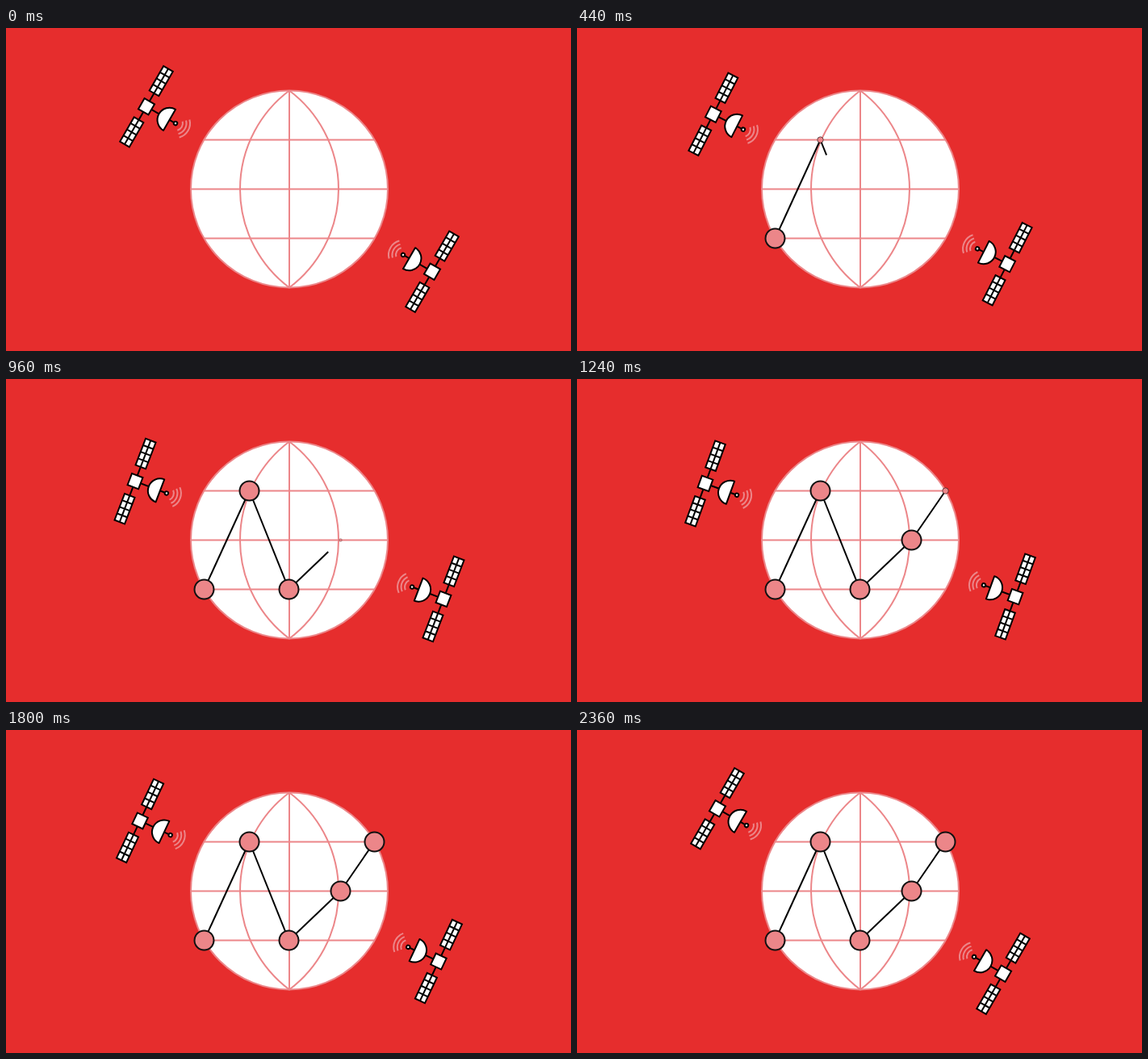
An HTML page for the animation above (2400 ms loop, 700 by 400 pixels).

```html
<!DOCTYPE html>
<html lang="en">
<head>
<meta charset="utf-8">
<title>Satellites</title>
<style>
  html, body { margin: 0; width: 100%; height: 100%; overflow: hidden; background: #e62d2d; }
  svg { display: block; width: 700px; height: 400px; }
  .pink { stroke: #ec8689; stroke-width: 2; fill: none; }
  .ink { stroke: #000; stroke-width: 2; fill: #fff; }
  #route { fill: none; stroke: #000; stroke-width: 2; stroke-linejoin: round; }
  #dots circle { fill: #ec8689; stroke: #111; stroke-width: 2; }
</style>
</head>
<body>
<svg viewBox="0 0 700 400">
  <defs>
    <g id="panel">
      <rect x="-6.7" y="-54" width="13.4" height="35"/>
      <path d="M0 -54V-19M-6.7 -45.25H6.7M-6.7 -36.5H6.7M-6.7 -27.75H6.7"/>
    </g>
    <g id="sat" transform="translate(-204.4 0)">
      <g class="ink">
        <path d="M0 -19V19M0 0H41"/>
        <use href="#panel"/>
        <use href="#panel" transform="rotate(180)"/>
        <rect x="-7.2" y="-7.6" width="14.4" height="15.2"/>
        <path d="M33 -15A15 15 0 0 0 33 15Z" stroke-linejoin="round"/>
        <circle cx="41.6" r="2.2"/>
      </g>
      <g id="waves" class="pink" transform="translate(41.6 0)"></g>
    </g>
  </defs>

  <g transform="translate(351 199.5)">
    <g class="pink">
      <circle r="122" style="fill:#fff"/>
      <path d="M0 -122V122M-122 0H122M-105.6 -61H105.6M-105.6 61H105.6"/>
      <path d="M0 -122A152.5 152.5 0 0 0 0 122A152.5 152.5 0 0 0 0 -122"/>
    </g>
    <g id="orbit">
      <use href="#sat"/>
      <use href="#sat" transform="rotate(180)"/>
    </g>
  </g>

  <polyline id="route" pathLength="1"/>
  <g id="dots"></g>
</svg>
<script>
  const LOOP = 2400, SWING = 2380;
  const points = [[245.5, 260.5], [301.5, 138.5], [350.5, 260.5], [414.5, 199.5], [456.5, 138.5]];
  const get = id => document.getElementById(id);
  const add = (parent, tag, attrs) => {
    const el = document.createElementNS('http://www.w3.org/2000/svg', tag);
    for (const key in attrs) el.setAttribute(key, attrs[key]);
    return parent.appendChild(el);
  };
  const sine = p => (1 - Math.cos(Math.PI * p)) / 2;
  const clamp = p => Math.min(1, Math.max(0, p));

  for (const r of [9, 13.5, 18]) {
    const c = r * Math.SQRT1_2;
    add(get('waves'), 'path', { d: `M${c} ${-c}A${r} ${r} 0 0 1 ${c} ${c}`, 'stroke-width': 2 });
  }

  const orbit = get('orbit'), route = get('route');
  route.setAttribute('points', points.join(' '));
  const dots = points.map(() => add(get('dots'), 'circle', { r: 12 }));

  function draw(t) {
    orbit.setAttribute('transform', `rotate(${30 - 10 * sine(2 * t / SWING)})`);

    // the route advances in ticks of 1/30 s
    const tick = Math.floor(t * 0.03 + 1e-6);
    const drawn = clamp(tick / 36);
    route.style.visibility = drawn ? 'visible' : 'hidden';
    route.setAttribute('stroke-dasharray', drawn < 1 ? `${drawn} 2` : 'none');

    dots.forEach((dot, i) => {
      const scale = sine(clamp((tick - 2 - 8 * i) / 8));
      dot.style.visibility = scale ? 'visible' : 'hidden';
      dot.setAttribute('transform', `translate(${points[i]}) scale(${scale})`);
    });
  }

  const start = performance.now();
  function loop() {
    draw((performance.now() - start) % LOOP);
    requestAnimationFrame(loop);
  }
  draw(0);
  requestAnimationFrame(loop);
</script>
</body>
</html>
```
